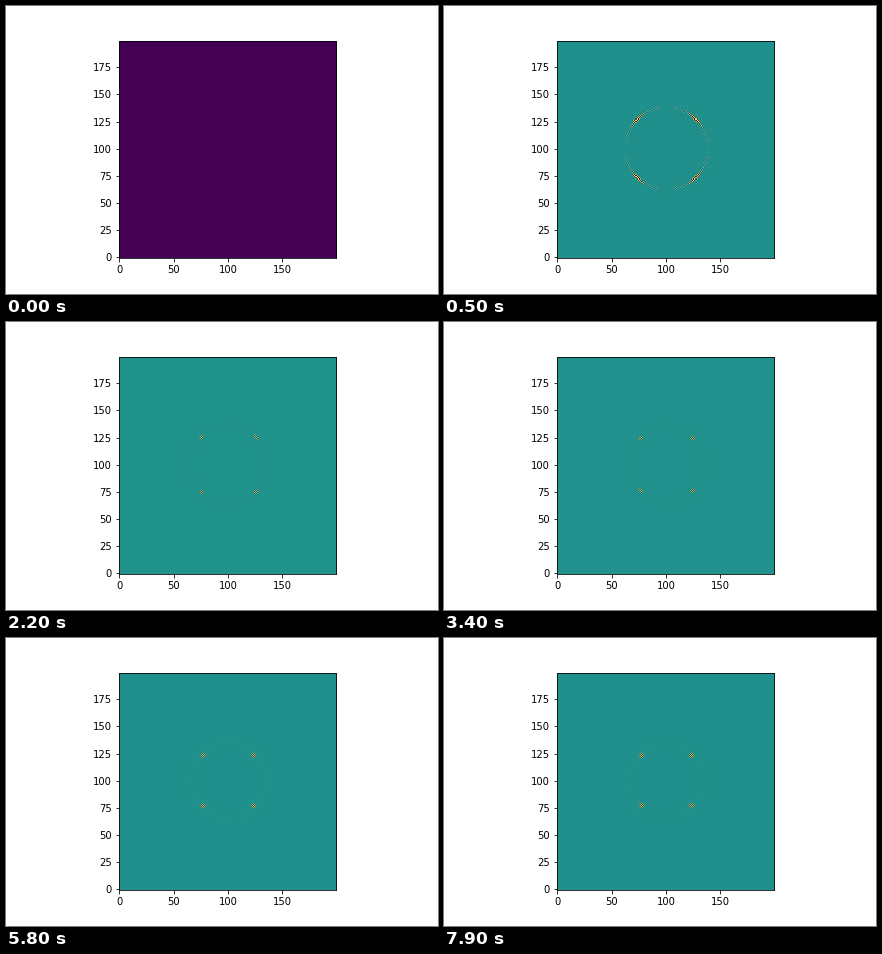
Animation, 432 px wide and 288 px high, one loop 8000 ms. Source, as a matplotlib script:

```python
import numpy as np
import matplotlib.pyplot as plt
from matplotlib.animation import FuncAnimation

SIZE, CENTER, RADIUS = 200, 100, 38
FRAMES, INTERVAL = 80, 100
RATE = 1.17          # far beyond the stable limit of 0.25
EARLY_STEPS = 5

y, x = np.mgrid[:SIZE, :SIZE]
dx, dy = x - CENTER, y - CENTER
r = np.hypot(dx, dy)
psi = np.arctan2(dy, dx) % (np.pi / 2) - np.pi / 4   # angle from nearest diagonal
checker = 1 - 2 * ((x + y) % 2)


def laplacian(u):
    return sum(np.roll(u, s, axis) for s in (1, -1) for axis in (0, 1)) - 4 * u


def diffused_disc(steps):
    """Explicit diffusion of a disc, overshooting at its rim."""
    u = (r >= RADIUS).astype(float)
    for _ in range(steps):
        u = u + RATE * laplacian(u)
    return u


def bell(d, width):
    return np.exp(-0.5 * (d / width) ** 2)


def rim_modes(n):
    """Checkerboard instability: four diagonal spots on a faint lobed ring."""
    width = 0.22 * np.sqrt(n)
    spot_r = 32.3 + 10.7 * np.exp(-n / 19)
    ring_r = 34.5 + 4 * np.exp(-n / 20)
    faint = 0.08 + 0.4 * np.exp(-n / 12)
    spots = bell(r - spot_r, width) * bell(r * psi, 1.8)
    ring = faint * np.cos(12 * psi) * bell(r - ring_r, width)
    u = (spots + ring) * checker * (-1) ** n
    return u / np.abs(u).max()


def field(n):
    """Values and colour limits at step n."""
    if n == 0:
        return np.zeros((SIZE, SIZE)), 0, 1
    if n <= EARLY_STEPS:
        u = diffused_disc(n - 1)
        return u, u.min(), u.max()
    return rim_modes(n), -1 - 0.8 / n, 1


fig, ax = plt.subplots(figsize=(6, 4), dpi=72, facecolor="white")
fig.subplots_adjust(left=0.125, right=0.9, bottom=0.125, top=0.88)
image = ax.imshow(np.zeros((SIZE, SIZE)), origin="lower", cmap="viridis",
                  vmin=0, vmax=1, interpolation="nearest")
ax.set_xticks(range(0, SIZE, 50))
ax.set_yticks(range(0, SIZE, 25))


def update(n):
    u, low, high = field(n)
    image.set_data(u)
    image.set_clim(low, high)
    return [image]


anim = FuncAnimation(fig, update, frames=FRAMES, interval=INTERVAL,
                     repeat=True, repeat_delay=0)
plt.show()
```
